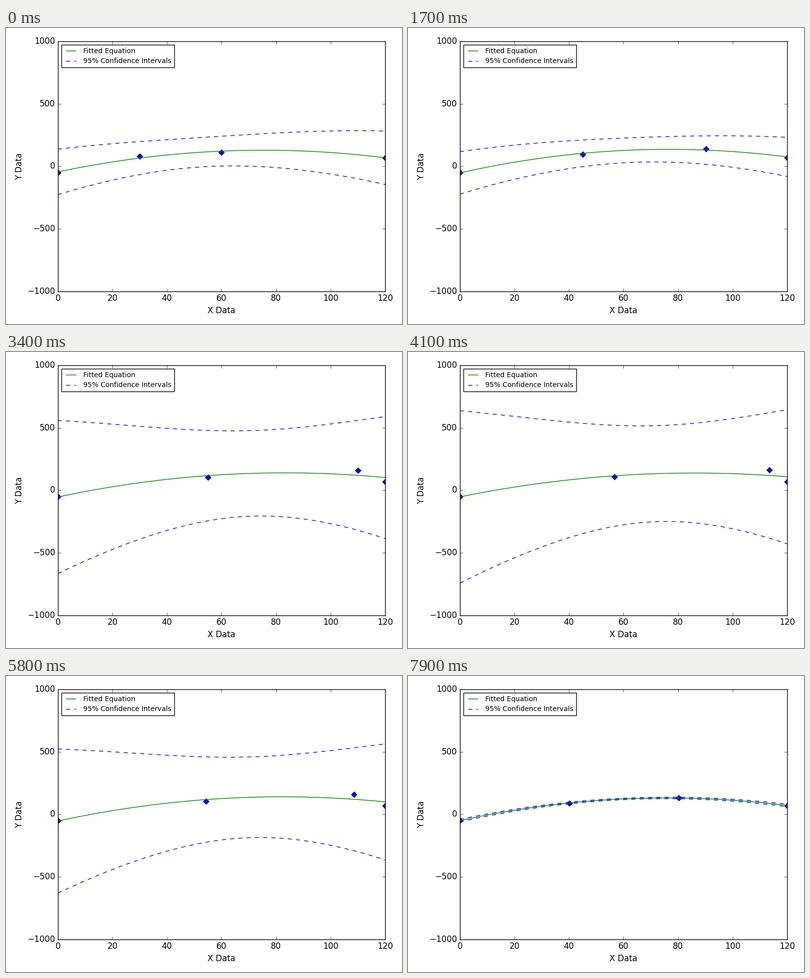
A matplotlib script that plays this animation: 800x600 px, repeating every 8 s.

```python
import numpy as np
import matplotlib.pyplot as plt
from matplotlib.animation import FuncAnimation

FRAMES, INTERVAL = 80, 100
T_95 = 12.7062  # two-sided 95% Student t, one degree of freedom

plt.style.use("classic")
plt.rcParams.update({
    "font.family": "DejaVu Sans",
    "figure.facecolor": "white",
    "savefig.facecolor": "white",
    "figure.dpi": 100,
    "savefig.dpi": 100,
})

fig = plt.figure(figsize=(8, 6), dpi=100)
ax = fig.add_axes([104.7 / 800, 66.2 / 600, 661.5 / 800, 506.8 / 600])
ax.set_xlim(0, 120)
ax.set_ylim(-1000, 1000)
ax.set_xticks(range(0, 121, 20))
ax.set_yticks(range(-1000, 1001, 500))
ax.set_xlabel("X Data")
ax.set_ylabel("Y Data")

grid = np.linspace(0, 120, 50)
points, = ax.plot([], [], "bD")
curve, = ax.plot([], [], "g-", label="Fitted Equation")
upper, = ax.plot([], [], "b--", label="95% Confidence Intervals")
lower, = ax.plot([], [], "b--")
ax.legend(loc="upper left", fontsize=10)


def data_at(frame):
    """Two inner points swing diagonally; the outer two stay put."""
    swing = 27 * np.sin(np.radians(2 * frame))
    shift = swing * np.array([0, 1, 2, 0])
    return (np.array([0, 30, 60, 120]) + shift,
            np.array([-50, 80, 111, 70.1]) + shift)


def fit_with_band(x, y):
    """Quadratic least squares with its confidence half-width on the grid."""
    coeffs = np.polyfit(x, y, 2)
    dof = len(x) - len(coeffs)
    variance = np.sum((y - np.polyval(coeffs, x)) ** 2) / dof
    spread = np.sum((x - x.mean()) ** 2)
    leverage = 1 / len(x) + (grid - x.mean()) ** 2 / spread
    return np.polyval(coeffs, grid), T_95 * np.sqrt(variance * leverage)


def update(frame):
    x, y = data_at(frame)
    fit, band = fit_with_band(x, y)
    points.set_data(x, y)
    curve.set_data(grid, fit)
    upper.set_data(grid, fit + band)
    lower.set_data(grid, fit - band)
    return points, curve, upper, lower


anim = FuncAnimation(fig, update, frames=FRAMES, interval=INTERVAL,
                     repeat=True, repeat_delay=0, blit=False)
plt.show()
```
